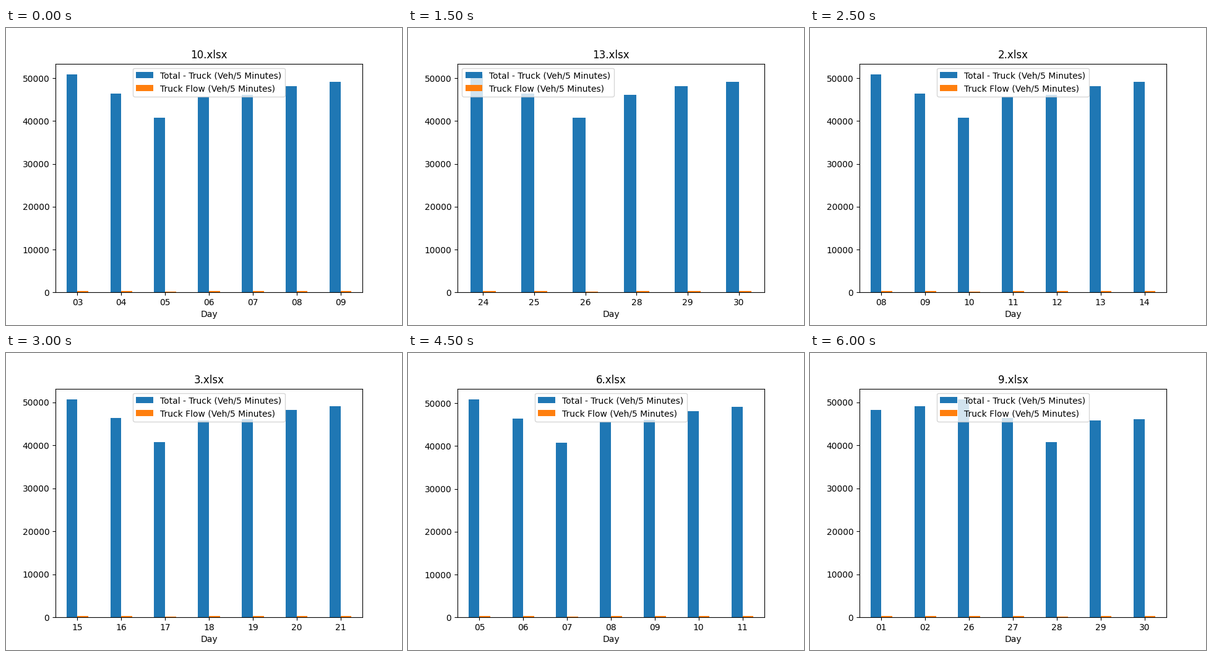
A matplotlib script that plays this animation: 640x480 px, repeating every 6500 ms.

```python
import matplotlib.pyplot as plt
import numpy as np
from matplotlib.animation import FuncAnimation

WEEKS = 13
FIRST_WEEK = 10
START = np.datetime64("2017-05-01")
NO_DATA = np.datetime64("2017-07-27")
BAR = 0.25

# Typical flow, Monday to Sunday
PROFILE = np.array([50880, 46440, 40800, 45680, 46130, 48170, 49190])


def week_data(week):
    """Day labels, car and truck totals, ordered by label."""
    dates = START + 7 * (week - 1) + np.arange(7)
    cars = PROFILE.copy()
    # Every sixth week part of Monday's flow moves to Thursday and Saturday
    if week % 6 == 3:
        cars[0] -= 200
        cars[[3, 5]] += 100
    known = dates != NO_DATA
    labels = np.array([str(d)[-2:] for d in dates[known]])
    cars = cars[known]
    order = np.argsort(labels)
    cars = cars[order]
    trucks = (cars - 30000) / 60
    return labels[order], cars, trucks


fig, ax = plt.subplots(figsize=(6.4, 4.8), dpi=100)


def draw(i):
    week = (FIRST_WEEK - 1 + i) % WEEKS + 1
    labels, cars, trucks = week_data(week)
    x = np.arange(len(labels))
    ax.clear()
    ax.bar(x - BAR / 2, cars, BAR, label="Total - Truck (Veh/5 Minutes)")
    ax.bar(x + BAR / 2, trucks, BAR, label="Truck Flow (Veh/5 Minutes)")
    ax.set_xlim(-0.5, len(x) - 0.5)
    ax.set_ylim(0, 1.05 * cars.max())
    ax.set_xticks(x, labels)
    ax.set_xlabel("Day")
    ax.set_title(f"{week}.xlsx")
    ax.legend(loc="best")
    return []


anim = FuncAnimation(fig, draw, frames=WEEKS, interval=500,
                     repeat=True, repeat_delay=0)
plt.show()
```
